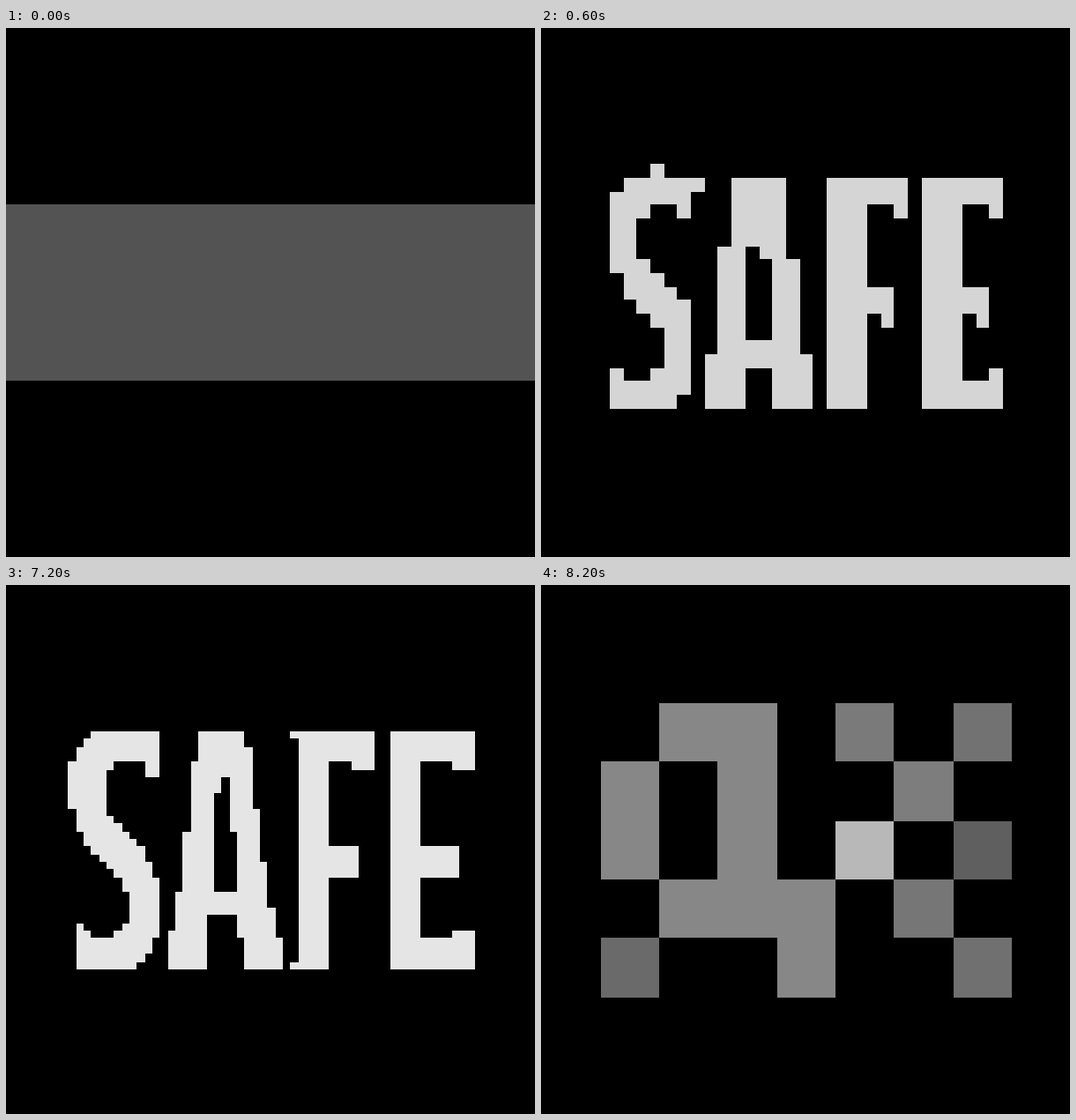
An HTML page with a canvas for the animation above (8.3 s loop, 600 by 600 pixels).

```html
<!DOCTYPE html>
<html lang="en">
<head>
<meta charset="utf-8">
<title>SAFE</title>
<style>
html, body { margin: 0; width: 100%; height: 100%; overflow: hidden; background: #000; }
canvas { display: block; width: 600px; height: 600px; }
</style>
</head>
<body>
<canvas id="stage" width="600" height="600"></canvas>
<script>
const SIZE = 600, STEP = 100, STEPS = 83, TOP = 12, INK = 243;
const ctx = document.getElementById('stage').getContext('2d');

const letters = {
  S: `M108 166.5L113 163.8 131 161.2 150 163.8 154 167H177.5V185L175.5 186V215H160L156 204 151 200.5H128
      L113 217 111 222V250L133 277 150 294 160 309 168 325 175 348V383L167 407 144 431 134 434
      H120L118 437.5H106L103 434H90L77.5 432.8V383H87L89 391 98 392 102 399.5H121
      L136 383 137.5 375V350L125 330 92 296 76 265 71.5 235 72 204 82 185 98 170Z`,
  A: `M217 166H271.5L276.3 196 284 260 290 306 300 364 311 412V433H266.5V403L262 378H229V433
      H182V415L195.5 346 205.5 270ZM242 215H247L254 258 263 338V352H231V300L237 285 238.5 236Z`,
  F: `M319 166.5H418.5V209H394.6V201H361.7V293H400V334H385V330H361.7V405H367.5V434
      H320V425H328.5V176H319Z`,
  E: `M433.6 166.5H529V209H505V201H470.5V293H509V334H494V330H470.5V400H505V391.5H529V432.8
      H433.6V352H436.5V240H433.6Z`
};

function layer() {
  const c = document.createElement('canvas');
  c.width = c.height = SIZE;
  return c.getContext('2d', { willReadFrequently: true });
}

const mask = layer();
for (const d of Object.values(letters)) mask.fill(new Path2D(d), 'evenodd');
const ink = mask.getImageData(0, 0, SIZE, SIZE).data;

// Share of ink in a square around (cx, cy), counting partly covered pixels.
function coverage(cx, cy, side) {
  const x0 = cx - side / 2, y0 = cy - side / 2, x1 = x0 + side, y1 = y0 + side;
  const overlap = (p, a, b) => Math.max(0, Math.min(p + 1, b) - Math.max(p, a));
  let sum = 0;
  for (let y = Math.floor(y0); y < y1 && y < SIZE; y++) {
    const h = overlap(y, y0, y1);
    for (let x = Math.floor(x0); x < x1 && x < SIZE; x++)
      sum += ink[(y * SIZE + x) * 4 + 3] * h * overlap(x, x0, x1);
  }
  return sum / 255 / side ** 2;
}

// A cell lights up when the middle third of it holds enough ink.
function build(level) {
  const n = 3 + 6 * level, cell = SIZE / n, limit = 0.5 - 0.5 / n;
  const snap = i => 2 * Math.ceil(SIZE / 2 * i / n - 1e-9);
  const lit = new Map(), key = (i, j) => j * n + i;

  for (let j = 0; j < n; j++)
    for (let i = 0; i < n; i++) {
      const x = (i + 0.5) * cell, y = (j + 0.5) * cell;
      if (coverage(x, y, cell / 3) > limit)
        lit.set(key(i, j), { i, j, tone: coverage(x, y, cell) });
    }

  // Joined cells share their mean tone, lone cells keep their own.
  const joined = ({ i, j }) =>
    [[1, 0], [-1, 0], [0, 1], [0, -1]].some(([dx, dy]) => lit.has(key(i + dx, j + dy)));
  const group = [...lit.values()].filter(joined);
  const mean = group.reduce((sum, c) => sum + c.tone, 0) / group.length;

  const out = layer();
  out.fillRect(0, 0, SIZE, SIZE);
  for (const c of lit.values()) {
    const v = Math.round(INK * (joined(c) ? mean : c.tone));
    const x = snap(c.i), y = snap(c.j);
    out.fillStyle = `rgb(${v},${v},${v})`;
    out.fillRect(x, y, snap(c.i + 1) - x, snap(c.j + 1) - y);
  }
  return out.canvas;
}

const views = Array.from({ length: TOP + 1 }, (_, level) => build(level));
const start = performance.now();

// The grid refines, holds at its finest, then coarsens again.
function draw() {
  const k = Math.floor((performance.now() - start) / STEP) % STEPS;
  ctx.drawImage(views[Math.min(TOP, k, STEPS - k)], 0, 0);
  requestAnimationFrame(draw);
}
draw();
</script>
</body>
</html>
```
